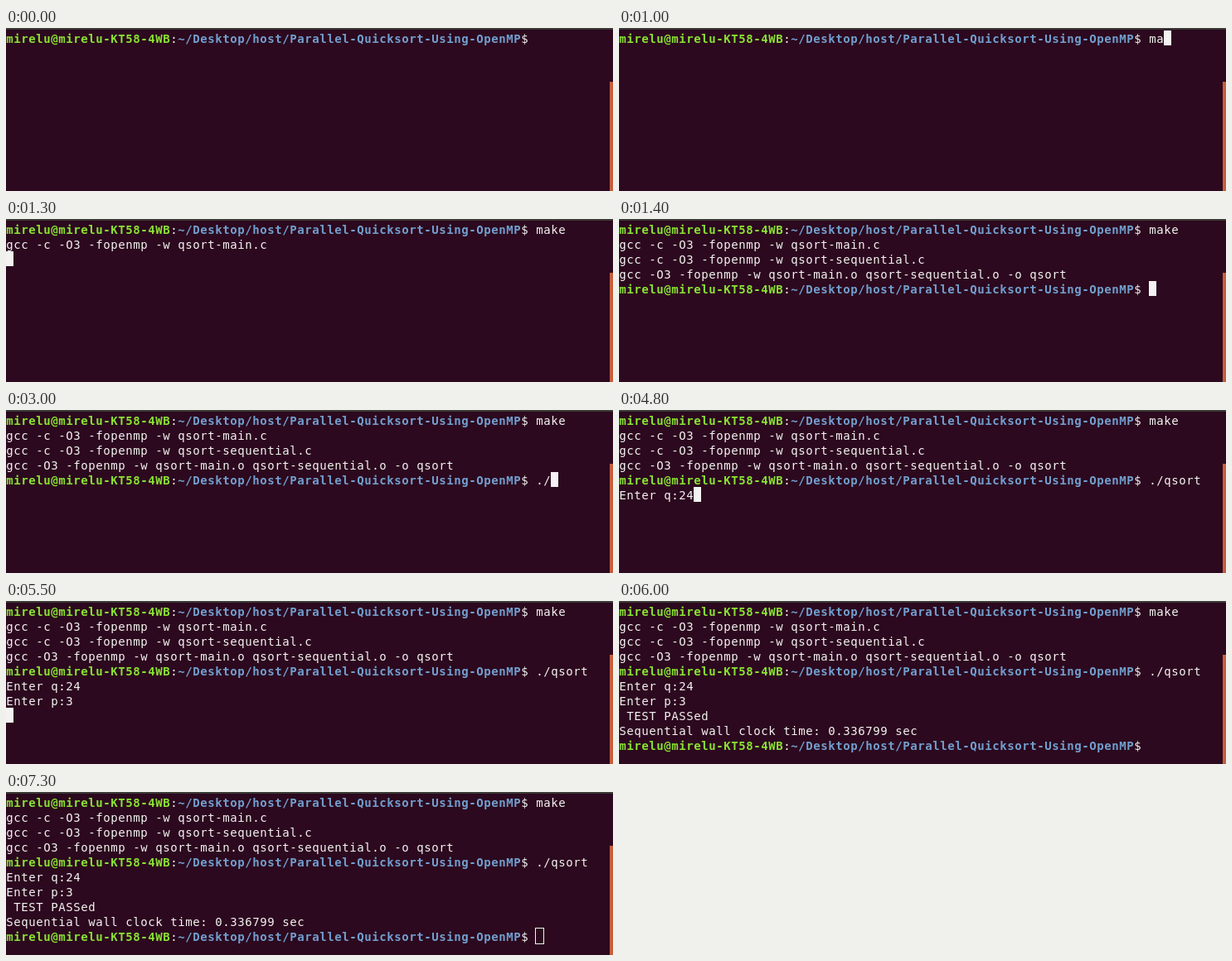
Recreate the animation shown at these times as an HTML page. Size 732 by 197 pixels, loop 7400 ms.

```html
<!DOCTYPE html>
<html lang="en">
<head>
<meta charset="utf-8">
<title>Terminal</title>
<style>
  html, body { margin: 0; width: 100%; height: 100%; overflow: hidden; background: #2c091e; }
  svg { display: block; width: 732px; height: 197px; }
  text {
    font: 14px "Ubuntu Mono", "DejaVu Sans Mono", "Liberation Mono", monospace;
    font-family: "DejaVu Sans Mono", "Liberation Mono", monospace;
    fill: #f4f2f3; text-anchor: middle; white-space: pre;
  }
  .user { font-weight: bold; fill: #8ae234; }
  .path { font-weight: bold; fill: #729fcf; }
</style>
</head>
<body>
<svg viewBox="0 0 732 197">
  <rect width="732" height="197" fill="#2c091e"/>
  <rect width="732" height="2" fill="#3c3b37"/>
  <rect x="728" y="65" width="4" height="132" fill="#c65e3c"/>
  <g id="screen"></g>
  <rect id="cursor"/>
</svg>
<script>
const LOOP = 7400, CELL = 9, ROW = 18, TOP = 3, ASCENT = 15, INK = "#f4f2f3";
const USER = "mirelu@mirelu-KT58-4WB";
const PATH = "~/Desktop/host/Parallel-Quicksort-Using-OpenMP";
const PROMPT_COLS = USER.length + PATH.length + 3;

const screen = document.getElementById("screen");
const cursor = document.getElementById("cursor");

const compile = "gcc -c -O3 -fopenmp -w qsort-main.c";
const built = [
  "$make", compile,
  "gcc -c -O3 -fopenmp -w qsort-sequential.c",
  "gcc -O3 -fopenmp -w qsort-main.o qsort-sequential.o -o qsort"
];
const running = [...built, "$./qsort"];
const answered = [...running, "Enter q:24", "Enter p:3"];
const done = [...answered, " TEST PASSed", "Sequential wall clock time: 0.336799 sec", "$"];

// [start, lines, cursor style]; a leading "$" stands for the prompt
const steps = [
  [0, ["$"], "off"],
  [400, ["$"], "on"],
  [600, ["$m"], "on"],
  [1000, ["$ma"], "on"],
  [1100, ["$make"], "on"],
  [1300, ["$make", compile, ""], "on"],
  [1400, [...built, "$"], "on"],
  [1800, [...built, "$"], "off"],
  [2400, [...built, "$"], "on"],
  [2800, [...built, "$."], "on"],
  [3000, [...built, "$./"], "on"],
  [3400, [...built, "$./q"], "on"],
  [3500, running, "on"],
  [4000, [...running, "Enter q:"], "on"],
  [4500, [...running, "Enter q:2"], "on"],
  [4800, [...running, "Enter q:24"], "on"],
  [5000, [...running, "Enter q:24", "Enter p:"], "on"],
  [5100, answered, "on"],
  [5500, [...answered, ""], "on"],
  [6000, done, "off"],
  [6300, done, "on"],
  [6900, done, "off"],
  [7300, done, "hollow"]
];

function write(str, col, row, cls = "") {
  const el = document.createElementNS("http://www.w3.org/2000/svg", "text");
  el.setAttribute("class", cls);
  // each character is centred in its grid cell, as in a terminal
  el.setAttribute("x", Array.from(str, (_, i) => (col + i + 0.5) * CELL).join(" "));
  el.setAttribute("y", TOP + row * ROW + ASCENT);
  el.textContent = str;
  screen.append(el);
}

function writeLine(line, row) {
  if (line[0] !== "$") {
    write(line, 0, row);
    return line.length;
  }
  const n = USER.length;
  write(USER, 0, row, "user");
  write(":", n, row);
  write(PATH, n + 1, row, "path");
  write("$", n + 1 + PATH.length, row);
  write(line.slice(1), PROMPT_COLS, row);
  return PROMPT_COLS + line.length - 1;
}

function placeCursor(col, row, style) {
  const hollow = style === "hollow";
  const grow = hollow ? 0.5 : 0;
  const box = {
    x: col * CELL - grow,
    y: TOP + row * ROW - grow,
    width: CELL + 2 * grow,
    height: ROW + 2 * grow,
    fill: hollow ? "none" : INK,
    stroke: hollow ? INK : "none",
    visibility: style === "off" ? "hidden" : "visible"
  };
  for (const key in box) cursor.setAttribute(key, box[key]);
}

let shown = null;
function draw(time) {
  const t = time % LOOP;
  const step = steps.findLast(s => s[0] <= t);
  if (step === shown) return;
  shown = step;
  const [, lines, style] = step;
  screen.replaceChildren();
  const cols = lines.map(writeLine);
  placeCursor(cols.at(-1), lines.length - 1, style);
}

const start = performance.now();
function tick() {
  draw(performance.now() - start);
  requestAnimationFrame(tick);
}
tick();
</script>
</body>
</html>
```
